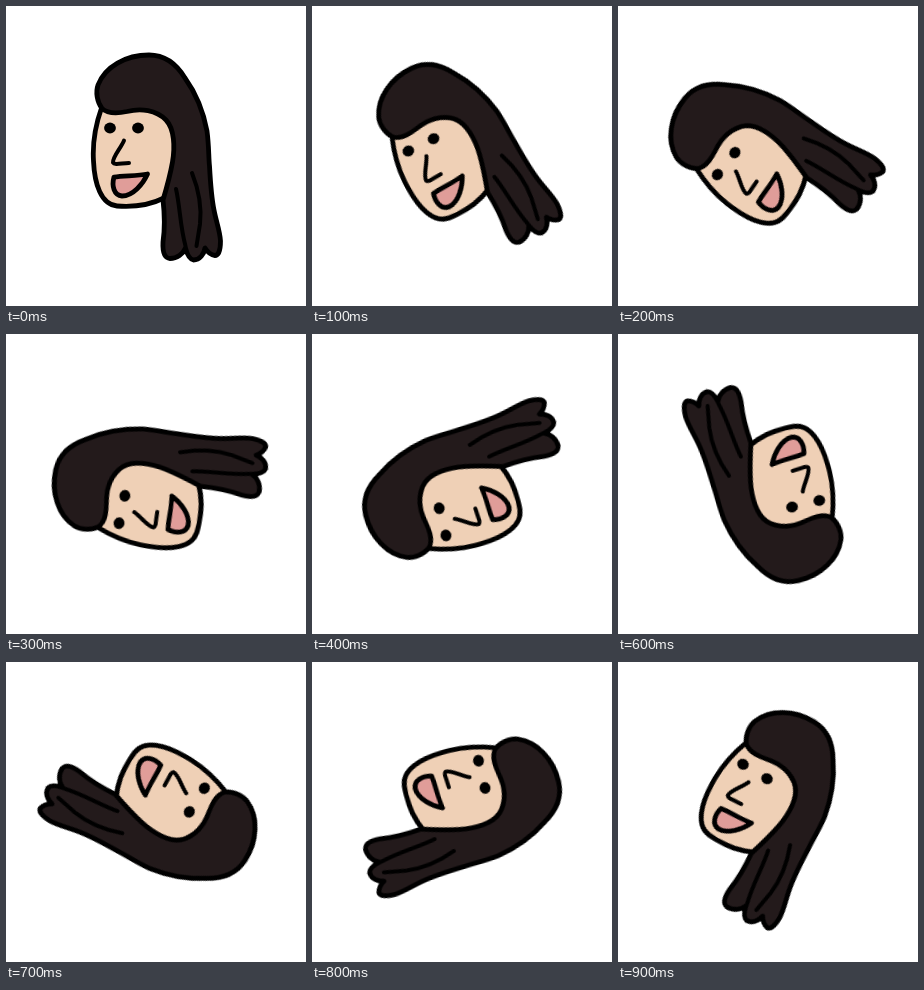
An HTML page that plays this animation: 300x300 px, repeating every 1000 ms.

```html
<!DOCTYPE html>
<html lang="en">
<head>
<meta charset="utf-8">
<title>Spinning head</title>
<style>
  html, body { margin: 0; width: 100%; height: 100%; overflow: hidden; background: #fff; }
  svg { display: block; width: 100%; height: 100%; }
  #head { transform-origin: 150px 150px; }
  .line { fill: none; stroke: #000; stroke-width: 4.8; stroke-linecap: round; stroke-linejoin: round; }
  .thin { stroke-width: 4; }
  .skin { fill: #efd0b6; }
  .hair { fill: #231a1b; }
  .lips { fill: #e09d99; }
</style>
</head>
<body>
<svg viewBox="0 0 300 300">
  <g id="head">
    <path class="line skin" d="M95.5 102 C89.5 119 86.5 139 87.5 155 C88.500 178 95 198.500 111 200
      C130 201.500 146 198 158 192 L180 150 L150 90 Z"/>
    <path class="line hair" d="M96 102.5 C91 96 89.5 86 92 79 C99 60.5 120 49 143 49
      C158 49 170.5 58 179 72 C189 86 197 104 201 125 C203 140 202.500 150 203.500 160
      C204.500 178 205.500 192 208 204 C210 215 214 225 214.5 235 C214.5 244 212.500 249.5 209 249.5
      C205 249 201.500 246 199 242 C198 248 194 254 187.5 254 C183 253 181 248 179.500 242
      C177 248 171 252.500 164 252.500 C157.500 252 156.500 245 157 236 C159 222 158.500 207 157 194
      C160 184 164 170 166.500 156 C169 141 168.500 123 160 114 C150 104 135 102 121 105.500
      C112 107.500 102 108 96 102.5 Z"/>
    <path class="line thin" d="M170 183 C174 200 174 220 179.5 240 M186 167 C192 182 196 200 194 218 L190.500 240"/>
    <ellipse cx="104" cy="122" rx="5.900" ry="5.400"/>
    <ellipse cx="132" cy="122" rx="5.900" ry="5.400"/>
    <path class="line thin" d="M118 134.5 C115 142 106.500 151 107 156.500 C108.500 159.500 116 157 123 157"/>
    <path class="line lips" d="M108 171 C118 169.500 131 170 141.500 168 C137 178 127 190 116 190
      C108 189.500 105.500 180 108 171 Z"/>
  </g>
</svg>
<script>
  // Pose angle for each tenth of the loop, held until the next.
  const turns = [0, 26, 51.5, 78, 104, 149.5, 193.5, 237.5, 283.5, 329, 360];
  const poses = turns.map((deg, i) => ({
    transform: `rotate(${-deg}deg)`,
    offset: i / 10,
    easing: 'step-end'
  }));
  document.getElementById('head').animate(poses, { duration: 1000, iterations: Infinity });
</script>
</body>
</html>
```
